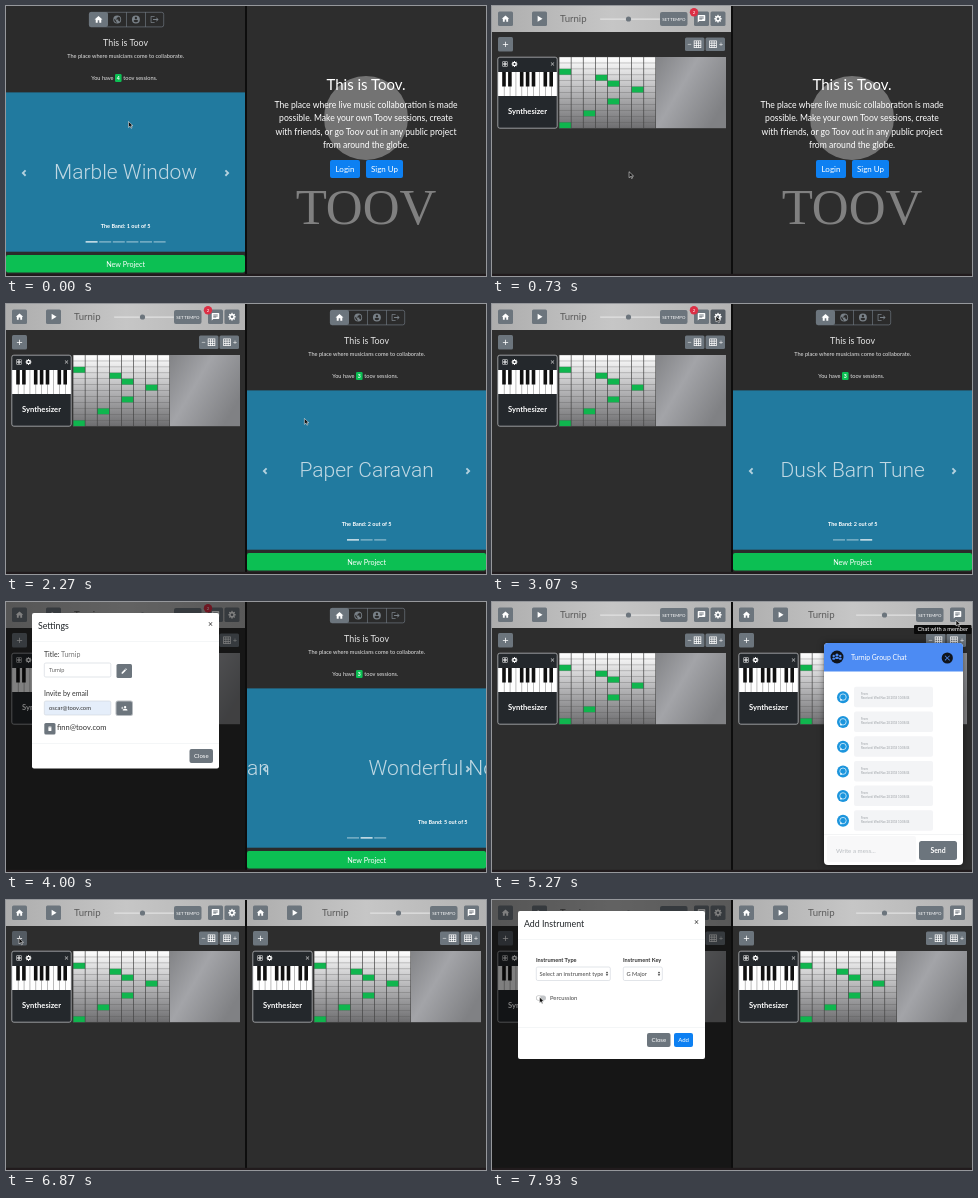
Animation of 480x270 px, one loop 8000 ms. Source, as an HTML page:

```html
<!DOCTYPE html>
<html lang="en">
<head>
<meta charset="utf-8">
<title>Toov</title>
<style>
html, body { margin: 0; width: 100%; height: 100%; overflow: hidden; background: #2d2d2d; }
#stage { display: block; width: 480px; height: 270px; font-family: Lato, "Open Sans", sans-serif; }
.thin { font-family: Roboto, sans-serif; font-weight: 300; }
.sans { font-family: "Liberation Sans", Arial, sans-serif; }
.mark { font-family: "Liberation Serif", serif; }
.chat { filter: drop-shadow(0 0 3px rgba(0, 0, 0, .5)); }
</style>
</head>
<body>
<svg id="stage" viewBox="0 0 480 270">
  <defs>
    <linearGradient id="bar"><stop stop-color="#adadad"/><stop offset=".5" stop-color="#c6c6c6"/><stop offset="1" stop-color="#b2b2b2"/></linearGradient>
    <linearGradient id="cells" x2="0" y2="1"><stop stop-color="#fff"/><stop offset=".5" stop-color="#b5b5b7"/><stop offset="1" stop-color="#6e6e70"/></linearGradient>
    <linearGradient id="block" y2=".6"><stop stop-color="#828386"/><stop offset=".45" stop-color="#a3a4a8"/><stop offset="1" stop-color="#808184"/></linearGradient>
  </defs>
</svg>
<script>
const LOOP = 8000, STEP = 200 / 3;
const GREY = '#6c757d', DEEP = '#545b62', BLUE = '#0d80f2', GREEN = '#0cbf53', DARK = '#2d2d2d';
const ME = 'oscar@toov.com', SONG = 'Turnip';
const stage = document.getElementById('stage');

// drawing helpers
function el(parent, tag, attrs = {}) {
  const node = document.createElementNS('http://www.w3.org/2000/svg', tag);
  for (const k in attrs) node.setAttribute(k, attrs[k]);
  parent.appendChild(node);
  return node;
}
const group = (p, attrs) => el(p, 'g', attrs);
const rect = (p, x, y, width, height, fill, rx = 0, more = {}) =>
  el(p, 'rect', { x, y, width, height, fill, rx, ...more });
const disc = (p, cx, cy, r, fill, more = {}) => el(p, 'circle', { cx, cy, r, fill, ...more });
function text(p, x, y, str, size, fill = '#fff', more = {}) {
  const node = el(p, 'text', { x, y, 'font-size': size, fill, ...more });
  node.textContent = str;
  return node;
}
const mid = (p, x, y, str, size, fill, more) => text(p, x, y, str, size, fill, { 'text-anchor': 'middle', ...more });
const view = (p, x, y, width, height, vx, vy) =>
  el(p, 'svg', { x, y, width, height, viewBox: `${vx} ${vy} ${width} ${height}` });

function gearPath() {
  const pts = [];
  for (let i = 0; i < 32; i++) {
    const a = (i - .5) * Math.PI / 16, r = i % 4 < 2 ? 10.5 : 7.5;
    pts.push((12 + r * Math.cos(a)).toFixed(1) + ' ' + (12 + r * Math.sin(a)).toFixed(1));
  }
  return 'M' + pts.join('L') + 'zM12 8.5a3.5 3.5 0 1 0 0 7a3.5 3.5 0 0 0 0-7z';
}
function gridPath() {
  let d = 'M2 2h20v20H2z';
  for (let i = 0; i < 9; i++) d += `M${4 + i % 3 * 6} ${4 + Math.floor(i / 3) * 6}h4v4h-4z`;
  return d;
}
const ICONS = {
  home: 'M10 20v-6h4v6h5v-8h3L12 3 2 12h3v8z',
  globe: 'M12 2a10 10 0 1 0 0 20a10 10 0 0 0 0-20zM4.2 10.2L9 15v1a2 2 0 0 0 2 2v1.9a8 8 0 0 1-6.8-9.7zM17.9 17.4A2 2 0 0 0 16 16h-1v-4H8v-2h3V7h2a2 2 0 0 0 2-2v-.4a8 8 0 0 1 2.9 12.8z',
  user: 'M12 2a10 10 0 1 0 0 20a10 10 0 0 0 0-20zm0 3a3 3 0 1 1 0 6a3 3 0 0 1 0-6zm0 14.2a7.2 7.2 0 0 1-6-3.2c0-2 4-3.1 6-3.1s6 1.1 6 3.1a7.2 7.2 0 0 1-6 3.2z',
  exit: 'M17 7l-1.4 1.4L18.2 11H8v2h10.2l-2.6 2.6L17 17l5-5zM4 5h8V3H4a2 2 0 0 0-2 2v14a2 2 0 0 0 2 2h8v-2H4z',
  play: 'M7 4v16l13-8z',
  chat: 'M20 2H4a2 2 0 0 0-2 2v18l4-4h14a2 2 0 0 0 2-2V4a2 2 0 0 0-2-2zM6 9h12v2H6zm0 3h8v2H6zM6 6h12v2H6z',
  plus: 'M19 13h-6v6h-2v-6H5v-2h6V5h2v6h6z',
  minus: 'M19 13H5v-2h14z',
  pencil: 'M3 17.2V21h3.8L17.8 9.9l-3.7-3.7zM20.7 7a1 1 0 0 0 0-1.4l-2.3-2.3a1 1 0 0 0-1.4 0l-1.8 1.8 3.7 3.7z',
  invite: 'M15 12a4 4 0 1 0 0-8a4 4 0 0 0 0 8zM6 10V7H4v3H1v2h3v3h2v-3h3v-2zm9 4c-2.7 0-8 1.3-8 4v2h16v-2c0-2.7-5.3-4-8-4z',
  trash: 'M6 19a2 2 0 0 0 2 2h8a2 2 0 0 0 2-2V7H6zM19 4h-3.5l-1-1h-5l-1 1H5v2h14z',
  close: 'M19 6.4L17.6 5 12 10.6 6.4 5 5 6.4 10.6 12 5 17.6 6.4 19 12 13.4 17.6 19 19 17.6 13.4 12z',
  prev: 'M18 6.5L14.5 3l-9 9 9 9 3.5-3.5-5.5-5.5z',
  next: 'M6 6.5L9.500 3l9 9-9 9L6 17.5l5.5-5.5z',
  sort: 'M12 3l5 7H7zM12 21l5-7H7z',
  gear: gearPath(),
  grid: gridPath()
};
const icon = (p, name, x, y, size, fill = '#fff') => el(p, 'path', {
  d: ICONS[name], fill, 'fill-rule': 'evenodd',
  transform: `translate(${x - size / 2} ${y - size / 2}) scale(${size / 24})`
});
function iconButton(p, name, x, y, w = 15, h = 14.5, size = 9) {
  const box = rect(p, x, y, w, h, GREY, 1.5);
  icon(p, name, x + w / 2, y + h / 2, size);
  return box;
}
function button(p, x, y, w, h, label, fill, size = 6) {
  const box = rect(p, x, y, w, h, fill, 2);
  mid(p, x + w / 2, y + h / 2 + size * .35, label, size);
  return box;
}
const field = (p, x, y, w, h, fill = '#fff') =>
  rect(p, x, y, w, h, fill, 1.5, { stroke: '#ced4da', 'stroke-width': .6 });

// time helpers
const ramp = (t, start, len) => Math.min(1, Math.max(0, (t - start) / len));
const within = (t, a, b) => t >= a && t < b;
const show = (node, on) => node.style.display = on ? '' : 'none';
const say = (node, str) => { if (node.textContent !== str) node.textContent = str; };
const typed = (str, t, start, end) => str.slice(0, Math.ceil(str.length * ramp(t, start, end - start)));

// screens
function home(p, slides) {
  const g = group(p), c = 119.6, ink = '#e4e4e4';
  rect(g, 0, 0, 240, 270, '#2b2b2b');
  rect(g, 83.3, 6.3, 74.4, 14.6, 'none', 2, { stroke: GREY, 'stroke-width': .7 });
  rect(g, 83, 6, 19, 15, GREY, 2);
  ['home', 'globe', 'user', 'exit'].forEach((name, i) => {
    const x = 92.5 + i * 18.7;
    if (i > 1) rect(g, x - 9.6, 6, .7, 15, GREY);
    icon(g, name, x, 13.5, 9.5, i ? '#798188' : '#fff');
  });
  mid(g, c, 40, 'This is Toov', 8.9, ink);
  mid(g, c, 52, 'The place where musicians come to collaborate.', 5.6, ink);
  text(g, 107.5, 73.5, 'You have', 5.6, ink, { 'text-anchor': 'end' });
  rect(g, 109, 68, 6.6, 8, GREEN, 1.2);
  const count = mid(g, 112.3, 73.8, '', 5.2, '#fff', { 'font-weight': 700 });
  text(g, 117.3, 73.5, 'toov sessions.', 5.6, ink);
  rect(g, 0, 86.4, 240, 159.3, '#217a9f');
  const pages = slides.map(([name, n]) => {
    const s = group(g);
    mid(s, c, 172.7, name, 21, '#c0d8e3', { class: 'thin' });
    mid(s, c, 222.3, `The Band: ${n} out of 5`, 5.5, '#fff', { 'font-weight': 700 });
    return s;
  });
  icon(g, 'prev', 18, 167, 9, '#b4d1de');
  icon(g, 'next', 221, 167, 9, '#b4d1de');
  const dots = Array.from({ length: 6 }, () => rect(g, 0, 235.3, 12, 1.2, '#fff'));
  rect(g, 0, 249, 239, 17.5, GREEN, 2);
  mid(g, c, 260.6, 'New Project', 7.2);
  return (t, on, moves, total, sessions) => {
    show(g, on);
    if (!on) return;
    const k = moves.findLastIndex(m => m[0] <= t);
    const now = moves[k][1], old = k ? moves[k - 1][1] : -1;
    const u = 1 - (1 - ramp(t, moves[k][0], 120)) ** 2.13;
    pages.forEach((s, i) => {
      show(s, i === now || (i === old && u < 1));
      s.setAttribute('transform', `translate(${i === now ? 240 * (1 - u) : -240 * u})`);
    });
    dots.forEach((d, i) => {
      show(d, i < total);
      d.setAttribute('x', c + (i - total / 2) * 13.6 + .8);
      d.setAttribute('opacity', i === now ? 1 : .5);
    });
    say(count, String(sessions));
  };
}

function landing(p) {
  const g = group(p), c = 119;
  rect(g, 0, 0, 240, 270, DARK);
  disc(g, c, 112, 42, '#737373');
  mid(g, c, 218, 'TOOV', 51, '#808080', { class: 'mark' });
  mid(g, c, 84, 'This is Toov.', 15);
  ['The place where live music collaboration is made',
   'possible. Make your own Toov sessions, create',
   'with friends, or go Toov out in any public project',
   'from around the globe.'].forEach((line, i) => mid(g, c, 101.8 + i * 13.4, line, 8.6));
  button(g, 83, 154, 30, 18, 'Login', BLUE, 8);
  button(g, 119, 154, 37, 18, 'Sign Up', BLUE, 8);
  return g;
}

function project(p, owner) {
  const g = group(p), dx = owner ? 0 : 15;
  rect(g, 0, 0, 240, 270, DARK);
  rect(g, 0, 0, 240, 26, 'url(#bar)');
  iconButton(g, 'home', 6, 5.5);
  iconButton(g, 'play', 40, 5.5);
  text(g, owner ? 68 : 75, 16.3, SONG, 9.6, '#5c5c5c');
  rect(g, 108 + dx, 12.4, 60, 1.3, '#e2e2e2', .6);
  disc(g, 136.5 + dx, 13, 2.6, GREY);
  button(g, 168 + dx, 6, 27.5, 14, 'SET TEMPO', GREY, 4.3);
  iconButton(g, 'chat', 202 + dx, 5.5);
  const gear = owner && iconButton(g, 'gear', 218.5, 5.5);
  const badge = group(g);
  disc(badge, 202, 6.3, 4.2, '#dc2f45');
  mid(badge, 202, 8, '2', 4.5);
  const add = iconButton(g, 'plus', 6, 31);
  ['minus', 'plus'].forEach((name, i) => {
    const x = 193 + i * 20.5;
    rect(g, x, 31.5, 19.5, 13.5, GREY, 1.5);
    icon(g, i ? 'grid' : name, x + (i ? 7.5 : 4.5), 38.2, i ? 9 : 6);
    icon(g, i ? name : 'grid', x + (i ? 15.5 : 12.5), 38.2, i ? 6 : 9);
  });
  // instrument card
  rect(g, 5.8, 51.2, 59.4, 71, '#24282c', 2);
  icon(g, 'grid', 13, 58, 6);
  icon(g, 'gear', 22.5, 58, 7);
  icon(g, 'close', 60.5, 58, 6);
  rect(g, 6, 66, 59, 24, '#fff');
  for (let i = 1; i < 10; i++) rect(g, 6 + i * 5.9, 66, .5, 24, '#777');
  [1, 2, 4, 5, 6, 8, 9].forEach(i => rect(g, 4.3 + i * 5.9, 66, 3.6, 14.5, '#111'));
  mid(g, 35.5, 108, 'Synthesizer', 7.6, '#fff', { 'font-weight': 700 });
  rect(g, 5.8, 51.2, 59.4, 71, 'none', 2, { stroke: '#b5b8ba', 'stroke-width': .8 });
  // note grid: 8 beats by 12 pitches
  const w = 12.1, h = 5.93;
  rect(g, 67, 51, w * 8, h * 12, 'url(#cells)');
  [[0, 2], [3, 3], [4, 4], [6, 5], [4, 7], [2, 9], [0, 11]].forEach(([x, y]) =>
    rect(g, 67 + x * w, 51 + y * h, w, h, '#0fb64e'));
  for (let i = 0; i <= 12; i++) rect(g, 67, 50.8 + i * h, w * 8, .5, '#555', 0, { opacity: .6 });
  for (let i = 0; i <= 8; i++) rect(g, 66.7 + i * w, 51, .7, h * 12, '#444');
  rect(g, 164, 51, 70, 71.2, 'url(#block)');
  const tip = group(g, { transform: `translate(${owner ? 180 : 181} 23)` });
  rect(tip, 0, 0, 57.5, 9, '#0a0a0a', 1);
  mid(tip, 28.7, 6.3, 'Chat with a member', 5.7);
  return { g, gear, add, badge, tip };
}

function modal(p, title, bottom) {
  const shade = rect(p, 0, 0, 240, 270, '#000');
  const g = group(p);
  rect(g, 26, 11, 187, bottom - 11, '#fff', 2);
  text(g, 32, 26.5, title, 8.8, '#212529');
  icon(g, 'close', 204.5, 22, 6.5, '#333');
  rect(g, 26, 39, 187, .5, '#e9ecef');
  return {
    g,
    at(t, open, shut) {
      const a = ramp(t, open, 130) * (1 - ramp(t, shut, 100));
      show(g, a > 0);
      show(shade, a > 0);
      shade.setAttribute('opacity', a * .5);
      g.setAttribute('opacity', a);
      g.setAttribute('transform', `translate(0 ${-20 * (1 - a)})`);
    }
  };
}

function login(p) {
  const m = modal(p, 'Login', 126), g = m.g;
  text(g, 32, 62, 'Email', 4.9, '#444', { class: 'sans' });
  const box = field(g, 44, 55, 58.5, 12);
  text(g, 103, 62, 'Password', 4.7, '#444', { class: 'sans' });
  field(g, 123, 55, 58.5, 12);
  const mail = text(g, 46, 63, '', 5.3, '#333', { class: 'sans' });
  const pass = text(g, 126, 63, '', 5.3, '#333', { class: 'sans' });
  button(g, 38, 85, 25, 13.5, 'Log in', BLUE);
  rect(g, 32.3, 106, 43, 13, '#fff', 2, { stroke: BLUE, 'stroke-width': .6 });
  text(g, 36, 114.6, 'Log in with', 6, BLUE);
  disc(g, 69.5, 112.5, 3, '#4285f4');
  button(g, 78, 107, 23, 12, 'Close', GREY);
  const list = group(g);
  rect(list, 43, 68, 72, 46, '#fff', 1, { stroke: '#bbb', 'stroke-width': .5 });
  [ME, 'Oscar@TOOV.com', 'ghslkdq'].forEach((s, i) =>
    text(list, 48, 78.6 + i * 13.5, s, 5.3, '#111', { class: 'sans' }));
  return t => {
    m.at(t, 930, 2080);
    show(list, within(t, 1390, 1640));
    say(mail, t < 1340 ? '' : t < 1640 ? 'o' : ME);
    say(pass, '•'.repeat(Math.round(8 * ramp(t, 1790, 160))));
    const focus = within(t, 1260, 1740);
    box.setAttribute('stroke', focus ? '#3b8ef0' : '#ced4da');
    box.setAttribute('stroke-width', focus ? 1.2 : .6);
  };
}

function settings(p) {
  const m = modal(p, 'Settings', 166.5), g = m.g;
  text(g, 38, 55.3, 'Title:', 7, '#333');
  text(g, 55, 55.3, SONG, 7, '#777');
  field(g, 38.3, 61, 66.5, 14);
  text(g, 43, 70, SONG, 5.6, '#666');
  iconButton(g, 'pencil', 110.5, 62, 15.5, 14, 7);
  text(g, 38, 94, 'Invite by email', 7, '#333');
  const box = field(g, 38.3, 99, 66.5, 14);
  const mail = text(g, 43, 108, '', 5.8, '#333');
  const ring = rect(g, 109.5, 98.5, 17.5, 15.5, '#b8bcc0', 2.5);
  iconButton(g, 'invite', 110.5, 99.5, 15.5, 13.5, 7);
  iconButton(g, 'trash', 38.3, 121, 11.2, 11.5, 6);
  text(g, 51, 128.3, 'finn@toov.com', 7.5, '#333');
  rect(g, 26, 141, 187, .5, '#e9ecef');
  button(g, 183.5, 147, 23.5, 14, 'Close', GREY);
  return t => {
    m.at(t, 3120, 4400);
    say(mail, typed(ME, t, 3530, 3760));
    box.setAttribute('fill', t >= 3760 ? '#e5eefa' : '#fff');
    show(ring, t >= 3900);
  };
}

function addInstrument(p) {
  const m = modal(p, 'Add Instrument', 159), g = m.g;
  [['Type', 44, 74, 'Select an instrument type'], ['Key', 131, 39, 'G Major']].forEach(([name, x, w, value]) => {
    text(g, x, 61.5, 'Instrument ' + name, 5.6, '#333', { 'font-weight': 700 });
    field(g, x + .3, 67, w, 13.5);
    text(g, x + 3.5, 75.7, value, 5.7, '#444');
    icon(g, 'sort', x + w - 3, 73.8, 6, '#333');
  });
  rect(g, 44, 95.5, 10, 5, '#c3c6c9', 2.5);
  disc(g, 46.7, 98, 2.4, '#fff', { stroke: '#aaa', 'stroke-width': .4 });
  text(g, 58, 100, 'Percussion', 5.8, '#444');
  rect(g, 26, 127, 187, .5, '#e9ecef');
  button(g, 155, 133, 23.5, 14, 'Close', GREY);
  button(g, 182, 133, 19, 14, 'Add', BLUE);
  return t => m.at(t, 7370, LOOP);
}

function chat(p, own) {
  const g = group(p, { class: 'chat' });
  rect(g, 91, 41, 139, 222, '#fff', 4);
  el(g, 'path', { d: 'M91 69.5V45a4 4 0 0 1 4-4h131a4 4 0 0 1 4 4v24.5z', fill: '#4c8bf3' });
  disc(g, 104, 55, 6.5, '#10141c');
  [[100.7, 54, 1.2], [104, 53, 1.6], [107.3, 54, 1.2]].forEach(([x, y, r]) => {
    disc(g, x, y, r, '#4c8bf3');
    rect(g, x - r * 1.2, y + r + .5, r * 2.4, 2, '#4c8bf3', 1);
  });
  text(g, 118, 58.3, SONG + ' Group Chat', 6.9);
  disc(g, 214.3, 56, 5.6, '#10141c');
  icon(g, 'close', 214.3, 56, 9, '#4c8bf3');
  const list = group(view(g, 91, 69.5, 139, 162.5, 91, 69.5));
  const bubble = (y, h, words, mine) => {
    const b = group(list), x = mine ? 149 : 121;
    rect(b, x, y, mine ? 67 : 79, h, mine ? '#4c8bf3' : '#f3f4f6', 2);
    if (!mine) {
      const cy = y + (words ? 13.5 : 10.5);
      disc(b, 110, cy, 6, '#1c95dd');
      disc(b, 110, cy - .2, 3.2, 'none', { stroke: '#d8effc', 'stroke-width': .8 });
      rect(b, 107, cy + 1.8, 2, 1.6, '#d8effc');
    }
    const ty = words ? y + 17 : y + 8.6, ink = mine ? '#e1ebff' : '#999ea3';
    if (words) text(b, x + 7, y + 12.5, words, 6.7, mine ? '#fff' : '#444');
    text(b, x + 7, ty, words ? 'From: ' + ME : 'From:', 2.9, ink);
    text(b, x + 7, ty + 4, 'Received: Wed Nov 28 2018 10:08:04', 2.9, ink);
    return b;
  };
  for (let i = 0; i < 6; i++) bubble(84.8 + i * 24.7, 20.5);
  const left = own === 'Hello';
  const hello = bubble(232, 26.5, 'Hello', left);
  const drums = bubble(263.5, 28, 'Add some drums!', !left);
  rect(g, 94, 234, 89, 26, '#f8f8f9', 2);
  rect(g, 91, 232, 139, .5, '#e6e8ea');
  const input = text(g, 103, 251.3, '', 6.2);
  const send = rect(g, 186, 239, 38, 19, GREY, 2.5);
  mid(g, 205, 251, 'Send', 6.9, '#fff', { 'font-weight': 700 });
  return (t, open, shut, from, to, scroll, lit) => {
    const a = ramp(t, open, 80) * (1 - ramp(t, shut, 80));
    show(g, a > 0);
    g.setAttribute('opacity', a);
    g.setAttribute('transform', `translate(0 ${10 * (1 - a)})`);
    list.setAttribute('transform', `translate(0 ${-scroll})`);
    show(hello, t >= 5680);
    show(drums, t >= 5920);
    const busy = within(t, from, to);
    say(input, busy ? typed(own, t, from, to - 30) : 'Write a mess...');
    input.setAttribute('fill', busy ? '#444' : '#b9bdc1');
    send.setAttribute('fill', lit ? BLUE : GREY);
  };
}

// assemble both halves
rect(stage, 0, 0, 480, 270, '#0d0d0d');
const L = view(stage, 0, 0, 239, 270, 0, 0), R = view(stage, 241, 0, 239, 270, 0, 0);
const homeL = home(L, [['Marble Window', 1], [SONG, 1]]);
const homeR = home(R, [['Paper Caravan', 2], ['Wonderful Nook', 5], ['Dusk Barn Tune', 2], [SONG, 2]]);
const front = landing(R), signIn = login(R);
const songL = project(L, true), songR = project(R, false);
const chatL = chat(L, 'Hello'), chatR = chat(R, 'Add some drums!');
const setup = settings(L), adder = addInstrument(L);
rect(stage, 0, 267.8, 480, 2.2, '#211b1d');
const arrow = el(stage, 'path', {
  d: 'M0 0v6l1.5-1.3 1 2.1 1-.4-1-2.1h2z', fill: '#111', stroke: '#fff', 'stroke-width': .5
});

const MOVES_L = [[-999, 0], [200, 1]];
const MOVES_R = [[-999, 0], [2450, 1], [2950, 2], [3450, 0], [3950, 1], [4450, 2], [4650, 3]];
// pointer stops: time, x, y
const PATH = [
  [0, 122.5, 115.5], [70, 122.5, 115.5], [190, 220, 166], [400, 220, 166], [540, 121, 166], [700, 121, 166],
  [900, 338, 162], [960, 338, 162], [1230, 310, 61], [1650, 305, 76], [1740, 394, 61], [1960, 394, 61],
  [2060, 292, 92], [2350, 300, 120], [2800, 224, 12], [3160, 224, 12], [3400, 70, 106], [4100, 118, 107],
  [4330, 195, 153], [4430, 195, 153], [4700, 360, 165], [4860, 360, 165], [5060, 464, 18], [5270, 464, 18],
  [5400, 208, 14], [5470, 208, 14], [5560, 140, 249], [5640, 204, 250], [5690, 204, 250], [5750, 400, 249],
  [5860, 400, 249], [5910, 446, 250], [6000, 148.5, 233], [6200, 148.5, 233], [6330, 214, 56], [6400, 214, 56],
  [6540, 455, 56], [6600, 455, 56], [6840, 13, 38], [7390, 13, 38], [7800, 47.5, 97]
];
function pointer(t) {
  const i = PATH.findLastIndex(k => k[0] <= t), a = PATH[i], b = PATH[i + 1] || a;
  const u = ramp(t, a[0], b[0] - a[0] || 1), e = u * u * (3 - 2 * u);
  arrow.setAttribute('transform', `translate(${a[1] + (b[1] - a[1]) * e} ${a[2] + (b[2] - a[2]) * e})`);
  show(arrow, !within(t, 1320, 1600) && !within(t, 3480, 4060));
}

function render(t) {
  homeL(t, t < 720, MOVES_L, 6, 4);
  show(songL.g, t >= 720);
  show(songL.badge, within(t, 720, 4450));
  show(songL.tip, within(t, 5380, 5500));
  songL.gear.setAttribute('fill', within(t, 2780, 3150) ? DEEP : GREY);
  songL.add.setAttribute('fill', t >= 6830 ? DEEP : GREY);
  chatL(t, 5450, 6380, 5540, 5680, 70 * ramp(t, 6100, 140), false);
  setup(t);
  adder(t);

  show(front, t < 2160);
  signIn(t);
  homeR(t, within(t, 2160, 4880), MOVES_R, t < 4500 ? 3 : 4, t < 4500 ? 3 : 4);
  show(songR.g, t >= 4880);
  show(songR.badge, false);
  show(songR.tip, within(t, 5050, 5320));
  chatR(t, 5120, 6580, 5740, 5920, 36 * ramp(t, 5680, 60) + 34 * ramp(t, 5920, 60), t >= 5890);
  pointer(t);
}

const start = performance.now();
function frame() {
  const t = (performance.now() - start) % LOOP;
  render(Math.floor((t + 5) / STEP) * STEP);
  requestAnimationFrame(frame);
}
frame();
</script>
</body>
</html>
```
